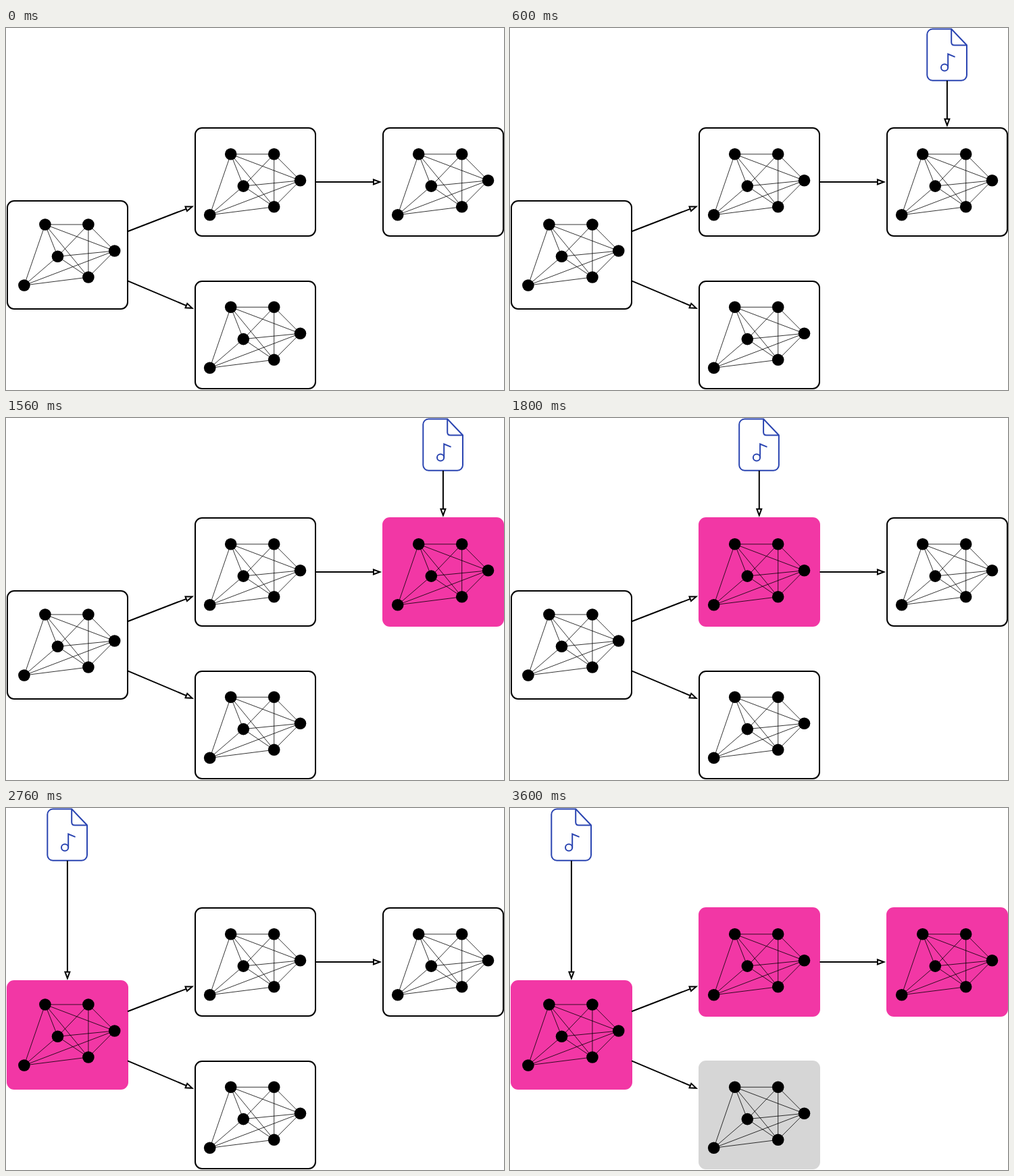
An HTML page that plays this animation: 737x536 px, repeating every 4.2 s.

```html
<!DOCTYPE html>
<html lang="en">
<head>
<meta charset="utf-8">
<title>Node pipeline</title>
<style>
  html, body { margin: 0; width: 100%; height: 100%; overflow: hidden; background: #fff; }
  svg { display: block; width: 737px; height: 536px; }
  .box { stroke-width: 2; }
  .edges { fill: none; stroke: #000; stroke-width: .8; }
  .arrow { fill: #fff; stroke: #000; stroke-width: 2; stroke-miterlimit: 10; }
  .doc { fill: none; stroke: #2b45b1; stroke-width: 2; }
</style>
</head>
<body>
<svg id="stage" viewBox="0 0 737 536"></svg>
<script>
const STEP = 600;
const stage = document.getElementById('stage');

const nodes = [[0, 0], [64, 0], [102.8, 39], [18.6, 47.3], [64, 78], [-31, 90]];
const links = ['01', '02', '03', '04', '05', '12', '13', '14', '23', '24', '25', '34', '35', '45'];

// One letter per step: w white, p pink, g grey
const looks = {
  w: { fill: '#ffffff', stroke: '#000000' },
  p: { fill: '#f237a5', stroke: '#f237a5' },
  g: { fill: '#d6d6d6', stroke: '#d6d6d6' }
};
const boxes = [
  { x: 2, y: 256, h: 160, gx: 57.9, gy: 291, steps: 'wwwwppp' },
  { x: 280, y: 148, h: 160, gx: 332.7, gy: 186.8, steps: 'wwwpwpp' },
  { x: 558, y: 148, h: 160, gx: 610.7, gy: 186.8, steps: 'wwpwwwp' },
  { x: 280, y: 375, h: 159, gx: 332.7, gy: 413.3, steps: 'wwwwwgg' }
];
const wires = [
  [180, 301.2, 278.2, 263.4],
  [180, 374.3, 278.2, 415.9],
  [458.5, 228, 556.2, 228]
];
// Document position, arrow tip and the steps in which it shows
const docs = [
  { x: 617.3, tip: 147, steps: '0110000' },
  { x: 339.2, tip: 147, steps: '0001000' },
  { x: 61.3, tip: 255, steps: '0000111' }
];

function add(tag, attrs, parent = stage) {
  const el = document.createElementNS('http://www.w3.org/2000/svg', tag);
  for (const k in attrs) el.setAttribute(k, attrs[k]);
  return parent.appendChild(el);
}

function play(el, steps, style) {
  const n = steps.length;
  const frames = [...steps].map((s, i) => ({ ...style(s), offset: i / n, easing: 'step-end' }));
  frames.push({ ...style(steps[n - 1]), offset: 1 });
  el.animate(frames, { duration: n * STEP, iterations: Infinity });
}

function graph(x, y) {
  const g = add('g', { transform: `translate(${x} ${y})` });
  const d = links.map(([a, b]) => `M${nodes[a]}L${nodes[b]}`).join('');
  add('path', { class: 'edges', d }, g);
  for (const [cx, cy] of nodes) add('circle', { cx, cy, r: 8.8 }, g);
}

function arrow([x1, y1, x2, y2], parent) {
  const len = Math.hypot(x2 - x1, y2 - y1);
  const deg = Math.atan2(y2 - y1, x2 - x1) * 180 / Math.PI;
  add('path', {
    class: 'arrow',
    transform: `translate(${x1} ${y1}) rotate(${deg})`,
    d: `M0 0H${len - 12.3}M${len - 12.3} -3.5L${len - 2.9} 0L${len - 12.3} 3.5Z`
  }, parent);
}

function sheet({ x, tip, steps }) {
  const g = add('g', {});
  const page = add('g', { class: 'doc', transform: `translate(${x} 1.5)` }, g);
  add('path', { d: 'M8 0H36L58.7 24V68.2a8 8 0 0 1-8 8H8a8 8 0 0 1-8-8V8a8 8 0 0 1 8-8Z' }, page);
  add('path', { d: 'M35.9 0V19.5q0 4.6 4.6 4.6H58.7' }, page);
  add('circle', { cx: 25.8, cy: 57, r: 5.1 }, page);
  add('path', { d: 'M30.9 57V37L41.3 41.4' }, page);
  arrow([x + 29.6, 78, x + 29.6, tip], g);
  play(g, steps, s => ({ visibility: s === '1' ? 'visible' : 'hidden' }));
}

for (const { x, y, h, gx, gy, steps } of boxes) {
  const rect = add('rect', { class: 'box', x, y, width: 178, height: h, rx: 10 });
  play(rect, steps, s => looks[s]);
  graph(gx, gy);
}
wires.forEach(w => arrow(w));
docs.forEach(sheet);
</script>
</body>
</html>
```
